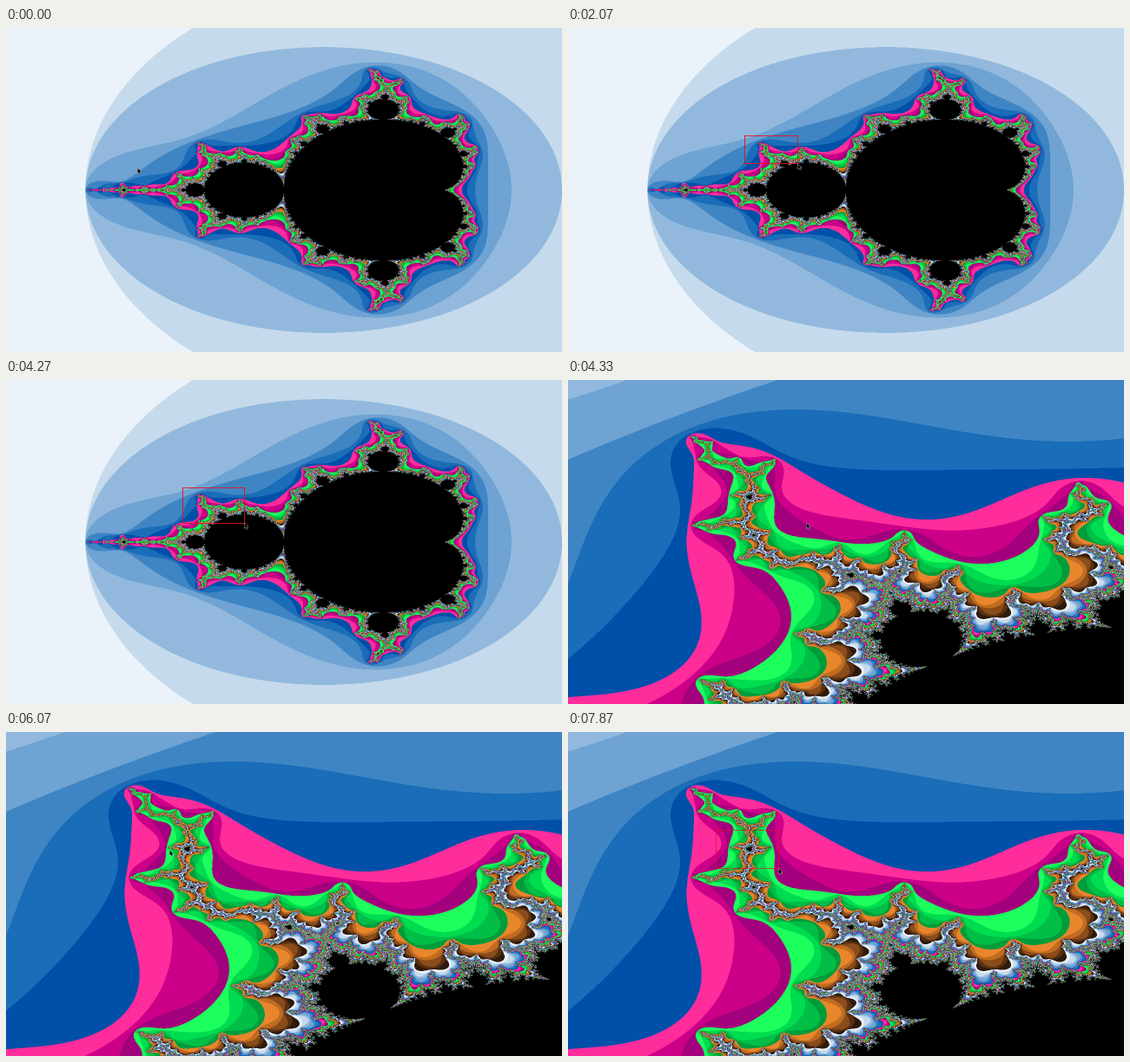
Animation of 640x374 px, one loop 8 s. Source, as an HTML page with a canvas:

```html
<!DOCTYPE html>
<html lang="en">
<head>
<meta charset="utf-8">
<title>Mandelbrot zoom</title>
<style>
  html, body { margin: 0; width: 100%; height: 100%; overflow: hidden; background: #000; }
  canvas { display: block; width: 640px; height: 374px; }
</style>
</head>
<body>
<canvas id="stage" width="640" height="374"></canvas>
<script>
const W = 640, H = 374, LOOP = 8000, ZOOM_AT = 4330;
const MAX_ITER = 100, SAMPLES = 2;

// Blues, pinks, greens and browns, repeated by escape count.
const PALETTE = [
  'ebf2f9', 'c5daec', '92b9dd', '6ea3d3', '3f85c3', '1a6db8', '004fa8',
  'ff2c9c', 'cc0088', 'a2007c',
  '1cff5c', '00dc50', '00be46', '009c3a',
  'e8862c', 'c06c22', '8a4c1a', '583012', '2e1a0c'
].map(hex => [0, 2, 4].map(i => parseInt(hex.substr(i, 2), 16)));

const VIEWS = [
  { left: -2.5, top: 1.5, width: 3.5, height: 3 },
  { left: -1.3802, top: 0.4973, width: 0.381, height: 0.3225 }
];

function escapeCount(a, b) {
  const b2 = b * b, p = a - 0.25, q = p * p + b2;
  const inCardioid = q * (q + p) <= b2 / 4;
  const inDisc = (a + 1) * (a + 1) + b2 <= 1 / 16;
  if (inCardioid || inDisc) return MAX_ITER;
  let x = a, y = b, n = 0;
  while (n < MAX_ITER) {
    const xx = x * x, yy = y * y;
    if (xx + yy > 4) break;
    y = 2 * x * y + b;
    x = xx - yy + a;
    n++;
  }
  return n;
}

function renderView({ left, top, width, height }) {
  const layer = document.createElement('canvas');
  layer.width = W;
  layer.height = H;
  const g = layer.getContext('2d');
  const img = g.createImageData(W, H);
  const total = SAMPLES * SAMPLES;
  for (let py = 0, k = 0; py < H; py++) {
    for (let px = 0; px < W; px++, k += 4) {
      let r = 0, gr = 0, bl = 0;
      for (let s = 0; s < total; s++) {
        const sx = px + (s % SAMPLES + 0.5) / SAMPLES;
        const sy = py + (Math.floor(s / SAMPLES) + 0.5) / SAMPLES;
        const n = escapeCount(left + sx / W * width, top - sy / H * height);
        if (n === MAX_ITER) continue;
        const c = PALETTE[n % PALETTE.length];
        r += c[0]; gr += c[1]; bl += c[2];
      }
      img.data[k] = r / total;
      img.data[k + 1] = gr / total;
      img.data[k + 2] = bl / total;
      img.data[k + 3] = 255;
    }
  }
  g.putImageData(img, 0, 0);
  return layer;
}

// Pointer path: time, x, y
const PATH = [
  [0, 151.5, 161.5], [200, 151.5, 161.5], [1000, 203.5, 124.5], [1270, 203.5, 124.5],
  [2070, 264.5, 156.5], [2800, 274.5, 165], [5670, 274.5, 165],
  [6070, 188.5, 136.5], [6450, 170.5, 113], [6650, 170.5, 113],
  [7200, 205, 131], [7870, 242.5, 157.5], [8000, 242.5, 157.5]
];

// Drag selections: start, end, anchor
const DRAGS = [
  { from: 1270, to: ZOOM_AT, x: 203.5, y: 124.5, alpha: 0.9 },
  { from: 6650, to: LOOP, x: 170.5, y: 113.5, alpha: 0.65 }
];

function pointerAt(t) {
  const i = Math.max(1, PATH.findIndex(p => p[0] > t));
  const [t0, x0, y0] = PATH[i - 1], [t1, x1, y1] = PATH[i];
  const u = (t - t0) / (t1 - t0);
  return [x0 + (x1 - x0) * u, y0 + (y1 - y0) * u];
}

const arrow = new Path2D('M0 0V6.2L1.5 4.9L2.6 7.3L3.6 6.8L2.5 4.5H4.4Z');
const ctx = document.getElementById('stage').getContext('2d');
const layers = VIEWS.map(renderView);

function draw(t) {
  ctx.drawImage(layers[t < ZOOM_AT ? 0 : 1], 0, 0);
  const [x, y] = pointerAt(t);

  const drag = DRAGS.find(d => t >= d.from && t < d.to);
  if (drag) {
    ctx.lineWidth = 1;
    ctx.strokeStyle = `rgba(232, 16, 24, ${drag.alpha})`;
    const snap = v => Math.floor(v) + 0.5;
    ctx.strokeRect(drag.x, drag.y, snap(x) - drag.x, snap(y) - drag.y);
  }

  ctx.save();
  ctx.translate(x, y);
  ctx.lineWidth = 0.9;
  ctx.strokeStyle = 'rgba(255, 255, 255, 0.75)';
  ctx.stroke(arrow);
  ctx.fillStyle = '#000';
  ctx.fill(arrow);
  ctx.restore();
}

const start = performance.now();
function tick() {
  draw((performance.now() - start) % LOOP);
  requestAnimationFrame(tick);
}
tick();
</script>
</body>
</html>
```
